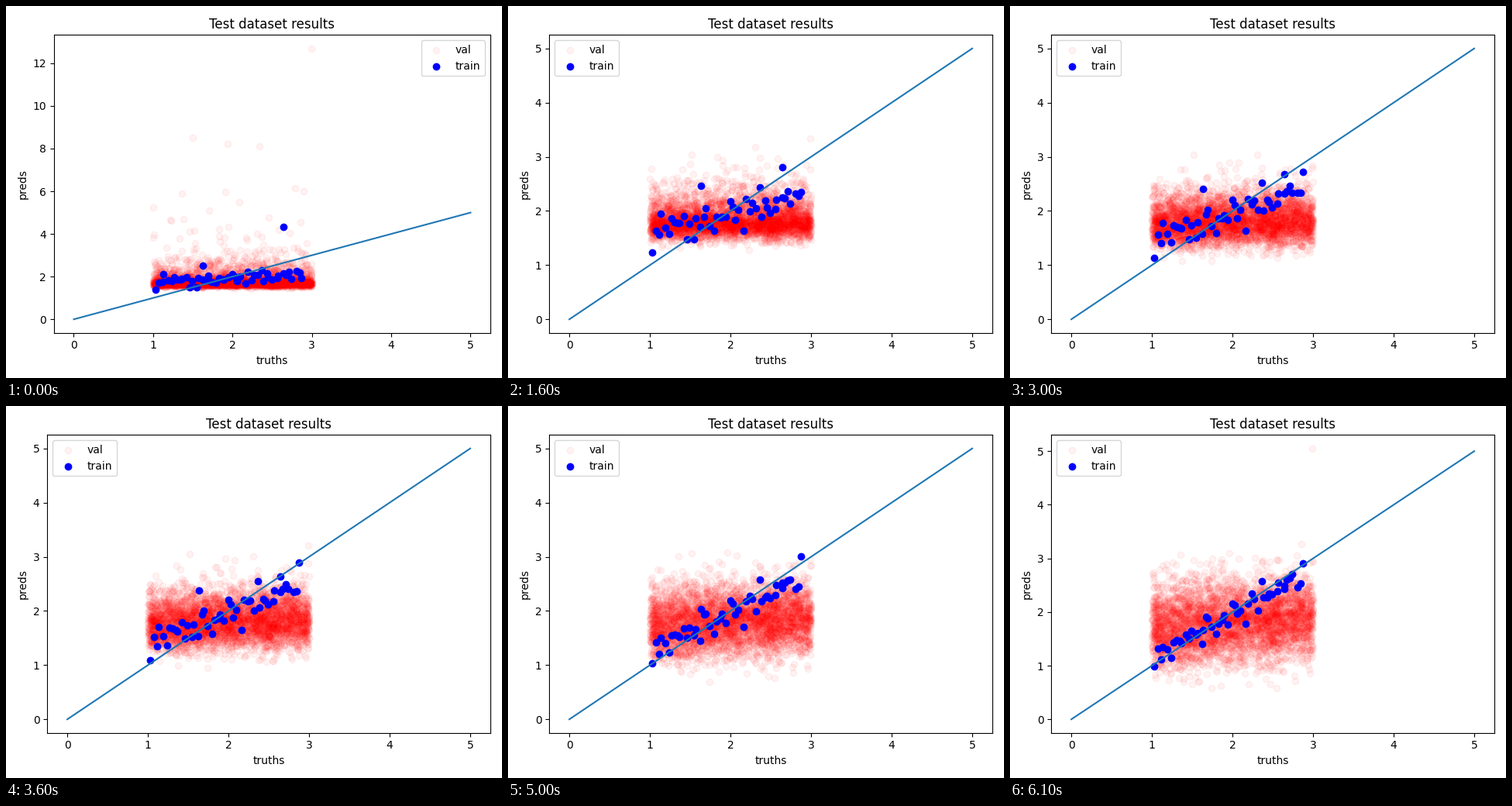
Recreate the animation shown at these times as a matplotlib script. Size 640 by 480 pixels, loop 6200 ms.

```python
import numpy as np
import matplotlib.pyplot as plt
from matplotlib.animation import FuncAnimation

FRAMES, INTERVAL = 62, 100
N_VAL, N_TRAIN, N_HIGH = 4000, 46, 18
rng = np.random.default_rng(12)

# Highest validation point: it sets the scale of the vertical axis
TOP_X = 2.99
TOP_TIMES = [0, 8, 16, 30, 42, 50, 61]
TOP_Y = [12.69, 6.35, 3.34, 2.8, 3.68, 2.84, 5.05]

# Training points that stand apart: truth and predictions over time
LONE_TIMES = [0, 8, 42, 61]
LONE = {
    1.63: [2.53, 2.51, 2.35, 1.67],
    2.64: [4.34, 2.88, 2.58, 2.43],
    2.87: [1.95, 2.17, 3.08, 2.91],
}

val_x = np.append(rng.uniform(1, 3, N_VAL), TOP_X)
val_z = rng.standard_normal((2, N_VAL))
high = 2.4 + rng.exponential(1.3, N_HIGH)

train_x = 1 + 1.85 * (np.arange(N_TRAIN) + rng.random(N_TRAIN)) / N_TRAIN
train_z = np.clip(rng.standard_normal((2, N_TRAIN)), -1.8, 1.8)
truths = np.append(train_x, list(LONE))


def turn(pair, angle):
    """Mix two noise rows, drifting from the first to the second."""
    return np.cos(angle) * pair[0] + np.sin(angle) * pair[1]


def log_interp(frame, times, values):
    return np.exp(np.interp(frame, times, np.log(values)))


def val_preds(frame):
    t = frame / (FRAMES - 1)
    z = turn(val_z, np.pi / 2 * t)
    # A narrow cloud with a long upper tail slowly becomes wide and even
    centre = 1.8 - 0.09 * np.exp(-frame / 4) + 0.1 * t**2 * (val_x[:-1] - 2)
    power = 1.05 + 0.95 * np.exp(-frame / 12)
    below = (0.09 + 0.31 * t) * np.abs(z) ** 0.9
    above = (0.25 + 0.15 * t**2) * np.abs(z) ** power
    y = centre + np.where(z < 0, -below, above)
    y[:N_HIGH] += high * np.exp(-frame / 7)
    return np.append(y, log_interp(frame, TOP_TIMES, TOP_Y))


def train_preds(frame):
    t = frame / (FRAMES - 1)
    slope = 0.15 + 0.7 * t
    noise = (0.2 - 0.05 * t**2) * turn(train_z, 1.2 * t)
    lone = [log_interp(frame, LONE_TIMES, track) for track in LONE.values()]
    return np.append(1.9 + 0.06 * t + slope * (train_x - 2) + noise, lone)


fig, ax = plt.subplots(figsize=(6.4, 4.8), dpi=100)
val = ax.scatter(val_x, val_x, color="red", alpha=0.05, label="val")
train = ax.scatter(truths, truths, color="blue", label="train")
ax.plot([0, 5], [0, 5])
ax.set(title="Test dataset results", xlabel="truths", ylabel="preds",
       xlim=(-0.25, 5.25))
legend = ax.legend(loc="upper right")


def update(frame):
    y = val_preds(frame)
    val.set_offsets(np.column_stack([val_x, y]))
    train.set_offsets(np.column_stack([truths, train_preds(frame)]))
    top = max(5, y[-1])
    ax.set_ylim(-0.05 * top, 1.05 * top)
    # The legend keeps clear of the diagonal
    legend.set_loc("upper right" if top > 5.57 else "upper left")
    fig.subplots_adjust(left=0.125, right=0.9, bottom=0.11, top=0.88)
    fig.tight_layout()
    return val, train, legend


anim = FuncAnimation(fig, update, frames=FRAMES, interval=INTERVAL,
                     repeat=True, repeat_delay=0, blit=False)
plt.show()
```
